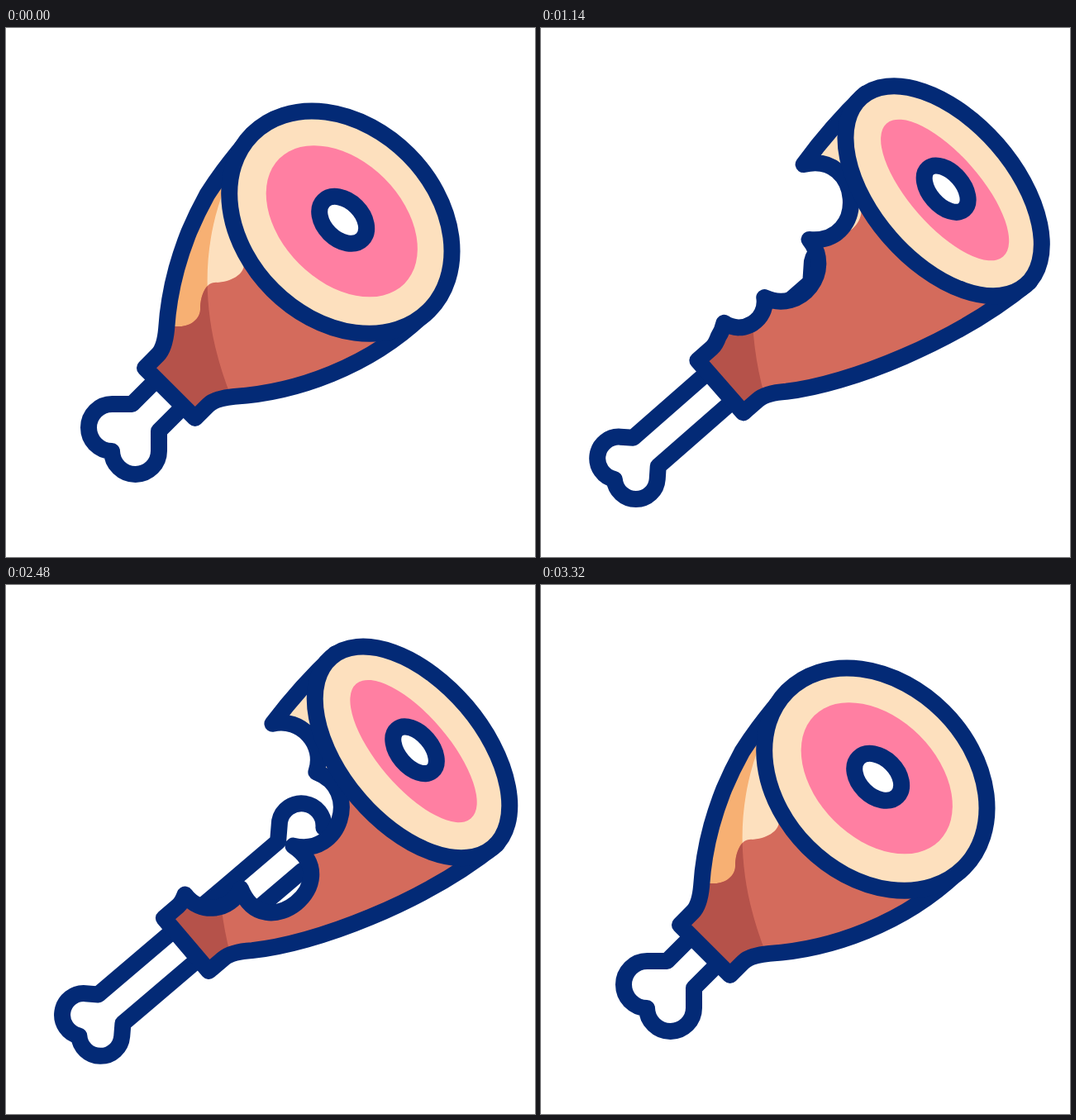
Recreate the animation shown at these times as an HTML page. Size 640 by 640 pixels, loop 3600 ms.

```html
<!DOCTYPE html>
<html lang="en">
<head>
<meta charset="utf-8">
<title>Ham</title>
<style>
  html, body { margin: 0; width: 100%; height: 100%; overflow: hidden; background: #fff; }
  svg { display: block; width: 100%; height: 100%; }
  .line { stroke: #032a76; stroke-width: 20; stroke-linejoin: round; }
  .spark { stroke: #ffcb4f; stroke-width: 20; stroke-linecap: round; }
</style>
</head>
<body>
<svg viewBox="0 0 640 640">
  <defs>
    <path id="meat"/>
    <path id="glaze"/>
    <path id="shade"/>
    <clipPath id="inMeat"><use href="#meat"/></clipPath>
    <clipPath id="inGlaze"><use href="#glaze"/></clipPath>
  </defs>
  <g id="ham">
    <!-- upright, symmetric ham, tilted by 45 degrees -->
    <g transform="translate(320 320) rotate(45)">
      <path id="bone" class="line" fill="#fff"/>
      <g clip-path="url(#inMeat)">
        <use href="#meat" fill="#fde0be"/>
        <g transform="rotate(-45) translate(-320 -320)">
          <use href="#shade" fill="#f7b073"/>
          <use href="#glaze" fill="#d46b5c"/>
          <g clip-path="url(#inGlaze)"><use href="#shade" fill="#b5524a"/></g>
        </g>
      </g>
      <use href="#meat" class="line" fill="none"/>
      <ellipse id="rind" class="line" rx="151" fill="#fde0be"/>
      <ellipse id="pink" rx="107" fill="#ff7fa2"/>
      <ellipse id="hole" class="line" rx="33" fill="#fff"/>
    </g>
  </g>
  <g id="sparks"></g>
</svg>
<script>
const LOOP = 3600;
const SHAFT = 23;
const $ = id => document.getElementById(id);
const lerp = (a, b, k) => a + (b - a) * k;
const clamp = v => Math.min(1, Math.max(0, v));
const ease = k => (1 - Math.cos(Math.PI * k)) / 2;
const set = (el, attrs) => Object.entries(attrs).forEach(([k, v]) => el.setAttribute(k, v));

// Point of a cubic curve
function pointAt([a, b, c, d], t) {
  const u = 1 - t;
  return [0, 1].map(i => u*u*u*a[i] + 3*u*u*t*b[i] + 3*u*t*t*c[i] + t*t*t*d[i]);
}

// Left edge as knots [x, y, sweep]: each is reached by an arc of that many degrees
const plainEdge = flank =>
  [.32, .5, .68, .84, 1].map((t, i) => [...pointAt(flank, t), i ? -6 : -10]);

// flank: left side curve; collar: half width, top, bottom; bone: lobe x, lobe y, radius;
// face: centre, height, hole height; glaze: turning points of the wave
function pose(flank, collar, bone, face, glaze, shade) {
  return { flank, edge: plainEdge(flank), collar, bone, face, glaze, shade };
}

const shortPose = pose(
  [[-150, -122], [-151, -20], [-104, 68], [-58, 120]],
  [43, 150, 172], [19.8, 251, 28.5], [-120, 116, 23],
  [[210, 361], [235, 340], [252, 308], [288, 286], [315, 262], [340, 240]],
  [[268, 185], [232, 270], [238, 360], [272, 445]]
);
const longPose = pose(
  [[-151, -212], [-148, -98], [-100, 35], [-57, 97]],
  [42, 130, 153], [15.6, 302.6, 26], [-206, 86, 20],
  [[228, 349], [251, 322], [274, 297], [304, 270], [334, 237], [368, 205]],
  [[243, 230], [240, 310], [242, 367], [266, 436]]
);
const bitten = knots => ({ ...longPose, edge: [longPose.edge[0], ...knots] });
const firstBite = bitten([[-63, -45, 199], [-46, 42, 155], [-55, 99, 133], [-47, 115, 20]]);
const secondBite = bitten([[-57, -102, 122], [-7, -23, 173], [-9, 59, 215], [-47, 115, 121]]);

const POSES = [
  [0, shortPose], [380, longPose], [660, longPose], [740, firstBite],
  [1620, firstBite], [1700, secondBite], [2952, secondBite], [3320, shortPose]
];
const nod = (start, half) => [[start, 0], [start + half, 6], [start + 2 * half, 0]];
const shake = start => [0, 5, -5, 5, 0].map((deg, i) => [start + 148 * i, deg]);
const TURNS = [[0, 0], ...nod(660, 340), ...nod(1620, 270), ...shake(2360)];
const BURSTS = [660, 1620];

// The two keys around a time and the eased progress between them
function between(keys, t) {
  const n = keys.findIndex(key => key[0] > t);
  if (n < 0) return [keys.at(-1)[1], keys.at(-1)[1], 0];
  const [t0, a] = keys[n - 1], [t1, b] = keys[n];
  return [a, b, ease((t - t0) / (t1 - t0))];
}

function mix(a, b, k) {
  if (typeof a === "number") return lerp(a, b, k);
  if (Array.isArray(a)) return a.map((v, i) => mix(v, b[i], k));
  return Object.fromEntries(Object.keys(a).map(key => [key, mix(a[key], b[key], k)]));
}

function arc([x0, y0], [x1, y1, sweep]) {
  const half = sweep * Math.PI / 360;
  const dir = Math.atan2(y1 - y0, x1 - x0);
  const reach = Math.hypot(x1 - x0, y1 - y0) / (3 * Math.cos(half / 2) ** 2);
  const [a, b] = [dir - half, dir + half];
  return `C${x0 + reach * Math.cos(a)} ${y0 + reach * Math.sin(a)} ` +
    `${x1 - reach * Math.cos(b)} ${y1 - reach * Math.sin(b)} ${x1} ${y1}`;
}

function meatPath({ flank, edge, collar: [w, top, foot] }) {
  const [a, b, c, d] = flank.map(([x, y]) => [-x, y]);
  const bend = y => lerp(y, top, .6);
  const arcs = edge.map((knot, i) => arc(i ? edge[i - 1] : flank[0], knot)).join("");
  return `M${flank[0]}${arcs}Q${-w} ${bend(edge.at(-1)[1])} ${-w} ${top}` +
    `L${-w} ${foot}L${w} ${foot}L${w} ${top}Q${w} ${bend(d[1])} ${d}C${c} ${b} ${a}Z`;
}

// Two round lobes beyond the shaft; way is 1 for the lower end, -1 for the upper
function knuckle([x, y, r], way) {
  const out = x + r * Math.SQRT1_2;
  const side = y - way * r * Math.SQRT1_2;
  const neck = side - way * (out - SHAFT);
  const notch = y + way * Math.sqrt(r * r - x * x);
  const lobe = `A${r} ${r} 0 0 0 `;
  return `L${-way * SHAFT} ${neck}L${-way * out} ${side}${lobe}0 ${notch}` +
    `${lobe}${way * out} ${side}L${way * SHAFT} ${neck}`;
}

const bonePath = lower =>
  `M${-SHAFT} 100${knuckle(lower, 1)}${knuckle([21.5, -49, 27], -1)}Z`;

// Quarter rounds that leave the knots level and upright in turn
function glazePath(knots) {
  const wave = knots.slice(1).map(([x1, y1], i) => {
    const [x0, y0] = knots[i];
    return i % 2
      ? `C${x0} ${lerp(y0, y1, .55)} ${lerp(x1, x0, .55)} ${y1} ${x1} ${y1}`
      : `C${lerp(x0, x1, .55)} ${y0} ${x1} ${lerp(y1, y0, .55)} ${x1} ${y1}`;
  });
  return `M150 ${knots[0][1]}L${knots[0]}${wave.join("")}L440 120L720 300L400 720L100 520Z`;
}

const shadePath = ([a, b, c, d]) => `M${a}C${b} ${c} ${d}V520H60V120Z`;

const rays = [[265, 186, 275, 241], [204, 232, 249, 265], [185, 304, 239, 295]].map(ends => {
  const el = document.createElementNS("http://www.w3.org/2000/svg", "line");
  el.setAttribute("class", "spark");
  $("sparks").append(el);
  return { el, ends };
});

function drawSparks(t) {
  const age = t - BURSTS.findLast(b => b <= t);
  const head = ease(clamp((age - 20) / 120));
  const tail = ease(clamp((age - 150) / 130));
  $("sparks").style.display = head > tail ? "" : "none";
  for (const { el, ends: [ox, oy, ix, iy] } of rays) {
    set(el, {
      x1: lerp(ix, ox, head), y1: lerp(iy, oy, head),
      x2: lerp(ix, ox, tail), y2: lerp(iy, oy, tail)
    });
  }
}

function draw(t) {
  const now = mix(...between(POSES, t));
  set($("meat"), { d: meatPath(now) });
  set($("bone"), { d: bonePath(now.bone) });
  set($("glaze"), { d: glazePath(now.glaze) });
  set($("shade"), { d: shadePath(now.shade) });
  const [cy, ry, holeRy] = now.face;
  set($("rind"), { cy, ry });
  set($("pink"), { cy: cy - 2, ry: ry - 43 });
  set($("hole"), { cy: cy - 4, ry: holeRy });
  set($("ham"), { transform: `rotate(${mix(...between(TURNS, t))} 130 510)` });
  drawSparks(t);
}

const start = performance.now();
function tick() {
  draw((performance.now() - start) % LOOP);
  requestAnimationFrame(tick);
}
tick();
</script>
</body>
</html>
```
